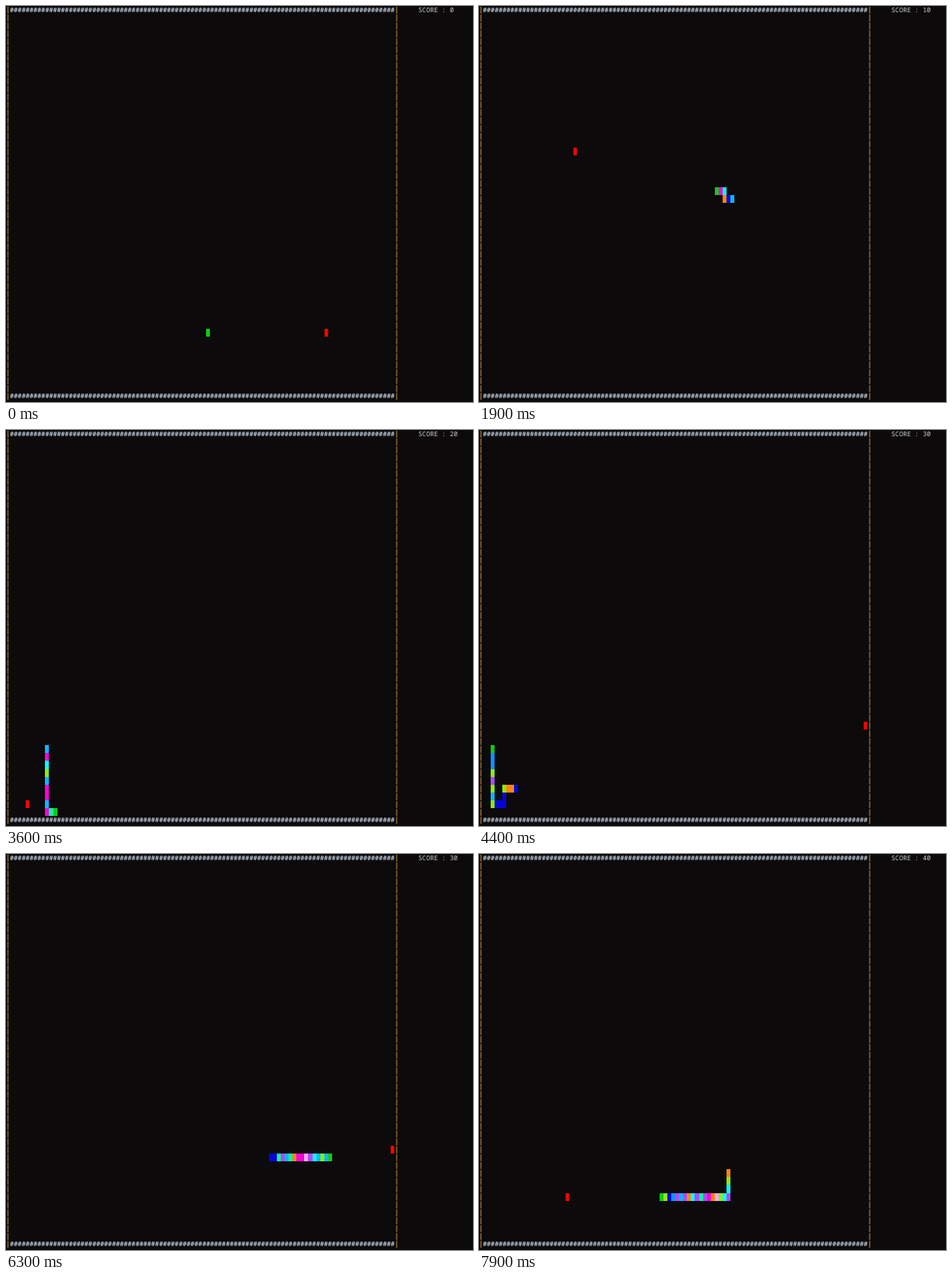
Animation of 600x509 px, one loop 8 s. Source, as an HTML page with a canvas:

```html
<!DOCTYPE html>
<html lang="en">
<head>
<meta charset="utf-8">
<title>Console snake</title>
<style>
  html, body { margin: 0; width: 100%; height: 100%; overflow: hidden; background: #0c0a0b; }
  canvas { position: absolute; left: 0; top: 0; }
  .line {
    position: absolute; top: 0.6px; white-space: pre; color: #ccc;
    font: 8.41px/10px "Noto Sans Mono", "DejaVu Sans Mono", monospace;
    text-rendering: geometricPrecision;
  }
  .wall { left: 5px; color: #b4c2d0; font-weight: 600; }
  #bottom { top: 497px; }
  #score { left: 529.8px; }
</style>
</head>
<body>
<canvas id="board" width="600" height="509"></canvas>
<div class="line wall" id="top"></div>
<div class="line wall" id="bottom"></div>
<div class="line" id="score">SCORE : 0</div>
<script>
const LOOP = 8000, TICK = 100;
const COLS = 99, ROWS = 50, CELL_W = 5.045, CELL_H = 10.13;
const SPEED = 5.132, DELAY = 0.95, START_TICK = 3, GROWTH = 5;

const $ = id => document.getElementById(id);
const ctx = $('board').getContext('2d');
$('top').textContent = $('bottom').textContent = '#'.repeat(COLS - 1);

const colors = ['#ff8410', '#b048ff', '#8cec08', '#ffa6f8', '#1090ff',
                '#08fcff', '#10f0a4', '#f404d4', '#0404d8', '#08b8ff'];
const steps = { L: [-1, 0], R: [1, 0], U: [0, -1], D: [0, 1] };
const foods = [[81, 41], [24, 18], [5, 47], [98, 37], [22, 43]];

// The player's key presses: a direction and how many cells it is held.
const moves = 'R36 U17 L25 U1 L27 U5 L15 D3 L10 D27 R12 U3 L16 D2 L3 U17 R17 D8 ' +
              'R78 U5 L9 D1 L5 D2 L2 D1 L2 D1 L2 D2 L15 D3 L17';

const route = [[51, 41]];
for (const move of moves.split(' ')) {
  const [dx, dy] = steps[move[0]];
  for (let n = +move.slice(1); n > 0; n--) {
    const [x, y] = route[route.length - 1];
    route.push([x + dx, y + dy]);
  }
}

let searched = 0;
const eatenAt = foods.map(([x, y]) => {
  const i = route.findIndex((c, n) => n >= searched && c[0] === x && c[1] === y);
  if (i < 0) return Infinity;
  return searched = i;
});

function headIndex(tick) {
  const i = Math.floor((tick - START_TICK) * SPEED - DELAY);
  return Math.min(Math.max(i, 0), route.length - 1);
}

// Every segment takes a new colour at each redraw.
function segmentColor(tick, n) {
  const v = Math.sin(tick * 12.9898 + n * 78.233) * 43758.5453;
  return colors[Math.floor((v - Math.floor(v)) * colors.length)];
}

function cell([col, row], color) {
  const x = Math.round(col * CELL_W), y = Math.round(row * CELL_H);
  ctx.fillStyle = color;
  ctx.fillRect(x, y, Math.round((col + 1) * CELL_W) - x, Math.round((row + 1) * CELL_H) - y);
}

function drawWalls() {
  ctx.fillStyle = '#b07c2c';
  for (const col of [0, COLS]) {
    for (let row = 0; row < ROWS; row++) {
      ctx.fillRect(col * CELL_W + 1.9, row * CELL_H + 0.9, 1.2, 9);
    }
  }
}

function drawFood(spot) {
  cell(spot, '#b40404');
  ctx.fillStyle = '#ff0404';
  ctx.fillRect(Math.round(spot[0] * CELL_W) + 1, Math.round(spot[1] * CELL_H), 3, 10);
}

function draw(tick) {
  const head = headIndex(tick);
  // Food is bitten from the neighbouring cell.
  const eaten = eatenAt.filter(i => i <= head + 1).length;
  ctx.clearRect(0, 0, 600, 509);
  drawWalls();
  drawFood(foods[eaten]);
  for (let n = Math.min(eaten * GROWTH, head); n > 0; n--) {
    cell(route[head - n], segmentColor(tick, n));
  }
  cell(route[head], '#0ccc10');
  $('score').textContent = 'SCORE : ' + eaten * 10;
}

let shown = -1;
function frame() {
  const tick = Math.floor(performance.now() % LOOP / TICK);
  if (tick !== shown) draw(shown = tick);
  requestAnimationFrame(frame);
}
frame();
</script>
</body>
</html>
```
